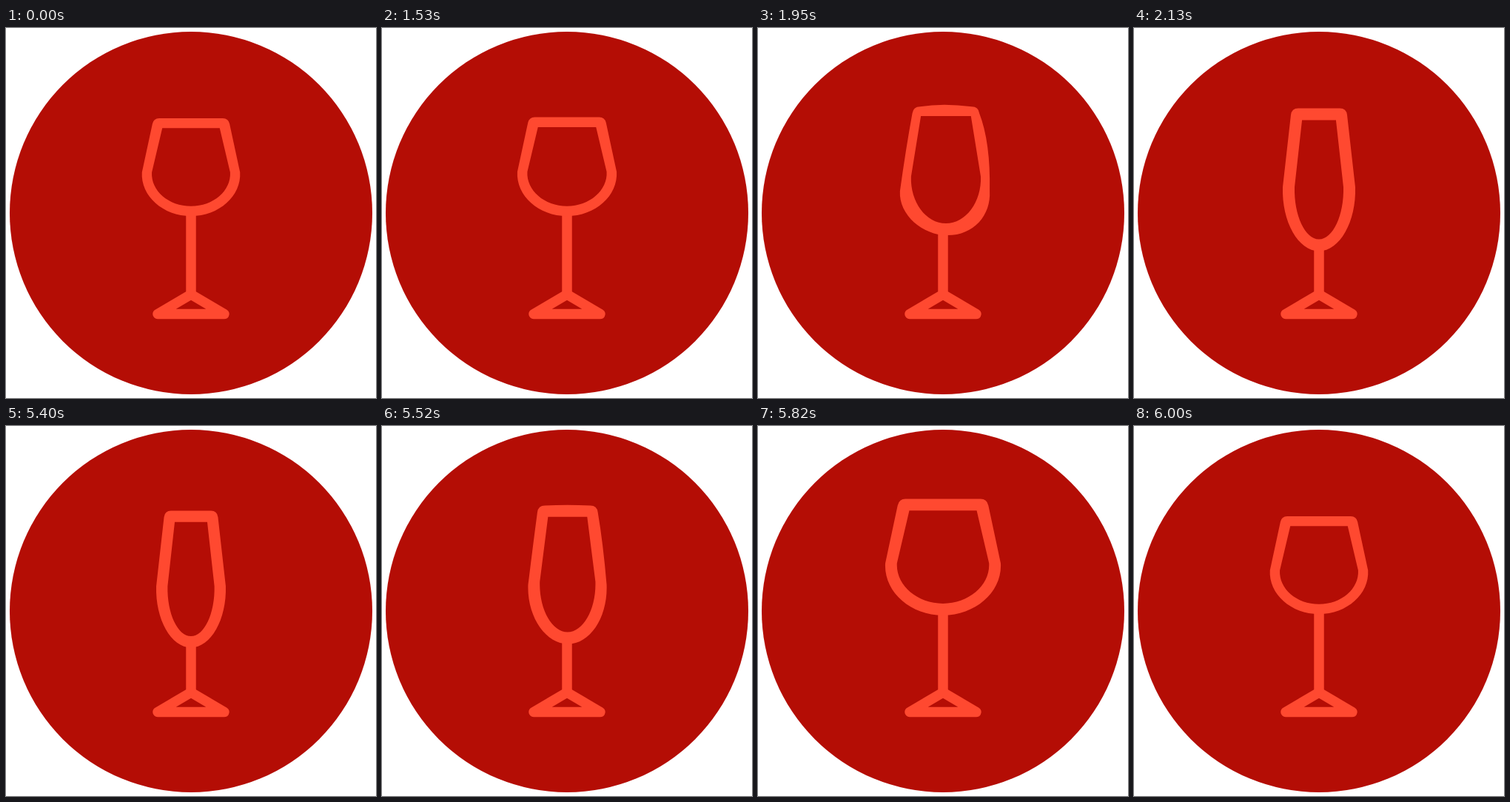
These frames come from a looping animation (500 px wide and 500 px high, 7500 ms). An HTML page:

```html
<!DOCTYPE html>
<html lang="en">
<head>
<meta charset="utf-8">
<title>Wine glass</title>
<style>
  html, body { margin: 0; width: 100%; height: 100%; overflow: hidden; background: #fff; }
  svg { display: block; width: 100vw; height: 100vh; }
</style>
</head>
<body>
<svg viewBox="0 0 500 500">
  <circle cx="250" cy="250" r="245" fill="#b40d05"/>
  <g fill="none" stroke="#ff4930" stroke-width="13.5" stroke-linejoin="round">
    <path d="M205 386.5L250 360L295 386.5Z"/>
    <path id="stem"/>
  </g>
  <path id="bowl" fill="#ff4930" fill-rule="evenodd"/>
</svg>
<script>
const LOOP = 7500, STEP = 30, STEPS = 21;
const TO_FLUTE = 1500, TO_WINE = 5370;
const BIG = 1.2, WALL = 16, ROUND = 9;

// Outer edge of the enlarged bowl, measured from the stage centre.
const wine = { top: -153.6, rim: 60.6, wide: 79.5, shoulder: -66, base: 5 };
const flute = { top: -141.5, rim: 37, wide: 49, shoulder: -35, base: 51.5 };

const bowl = document.getElementById('bowl');
const stem = document.getElementById('stem');

const mix = (a, b, m) => a + (b - a) * m;
const ramp = (n, from, to) => Math.max(0, Math.min(1, (n - from) / (to - from)));

function blend(a, b, m) {
  const out = {};
  for (const key in a) out[key] = mix(a[key], b[key], m);
  return out;
}

function inset(g) {
  return {
    top: g.top + WALL, rim: g.rim - WALL * 0.88, wide: g.wide - WALL,
    shoulder: g.shoulder, base: g.base - WALL
  };
}

// One side of an edge, from the rim down; wobble skews it while morphing.
function side(dir, g, round, wobble) {
  const left = dir < 0;
  const top = g.top + 3.5 * wobble;
  const rim = g.rim - (left ? 8 * wobble : 0);
  const wide = g.wide - (left ? 5 * wobble : 0);
  const shoulder = g.shoulder + 20 * wobble;
  const bulge = (left ? 1 : 9) * wobble;
  const bend = round / (shoulder - top);
  return [
    [rim - round, top], [rim, top],
    [mix(rim, wide, bend), top + round],
    [(rim + wide) / 2 + bulge, (top + shoulder) / 2 - bulge], [wide, shoulder],
    [wide * 1.03, mix(shoulder, g.base, 0.54)],
    [wide * 0.57 - dir * -6 * wobble, g.base]
  ].map(([x, y]) => [dir * x, y]);
}

function edge(g, round, wobble, shift, scale) {
  const right = side(1, g, round, wobble);
  const left = side(-1, g, round, wobble).reverse();
  const peak = [0, g.top - 2 * wobble];
  const foot = [6 * wobble, g.base];
  const p = [peak, ...right, foot, ...left].map(([x, y]) =>
    [x + shift, y].map(v => (250 + v * scale).toFixed(2)).join(' '));
  return `M${p[15]}Q${p[0]} ${p[1]}Q${p[2]} ${p[3]}Q${p[4]} ${p[5]}` +
    `C${p[6]} ${p[7]} ${p[8]}C${p[9]} ${p[10]} ${p[11]}` +
    `Q${p[12]} ${p[13]}Q${p[14]} ${p[15]}Z`;
}

function pose(t) {
  const back = t >= TO_WINE;
  const n = Math.max(0, Math.min(STEPS, Math.floor((t - (back ? TO_WINE : TO_FLUTE)) / STEP)));
  if (!back) return { size: ramp(n, 0.5, 8.5), morph: ramp(n, 8, 21) };
  const grow = n ? ramp(n, -5, 3) : 1;
  return { size: grow - ramp(n, 14.5, 21), morph: 1 - ramp(n, 3.2, 15.2) };
}

function draw(t) {
  const { size, morph } = pose(t);
  const scale = mix(1, BIG, size) / BIG;
  const wobble = Math.sin(Math.PI * morph) ** 2;
  const g = blend(wine, flute, morph);
  bowl.setAttribute('d',
    edge(g, ROUND, wobble, 0, scale) + edge(inset(g), 0, 0, 4 * wobble, scale));
  stem.setAttribute('d', `M250 ${250 + (g.base - WALL / 2) * scale}V360`);
}

const start = performance.now();

function frame(now) {
  draw(Math.max(0, now - start) % LOOP);
  requestAnimationFrame(frame);
}

draw(0);
requestAnimationFrame(frame);
</script>
</body>
</html>
```
